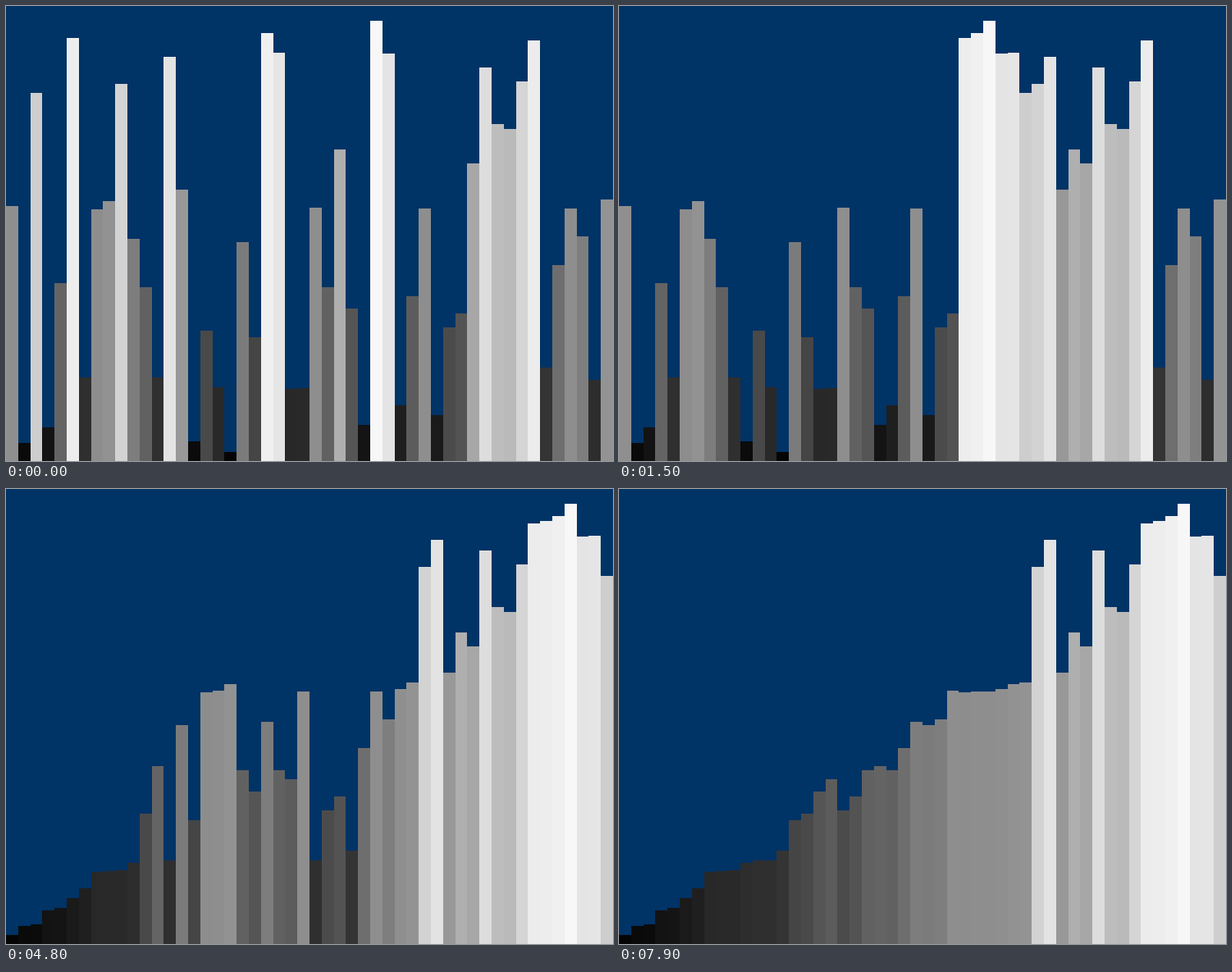
These frames come from a looping animation (740 by 555 pixels, 8000 ms). A matplotlib script:

```python
from itertools import islice

import matplotlib.pyplot as plt
from matplotlib.animation import FuncAnimation
from matplotlib.patches import Rectangle

W, H = 740, 555
FRAME_MS, LOOP_MS = 50, 8000
STEP_MS, LEAD_MS = 40, 20  # one comparison per step

# The unsorted input: everything else follows from the sort.
VALUES = [
    311, 22, 449, 41, 217, 516, 102, 307, 317, 460,
    271, 212, 102, 493, 331, 24, 159, 90, 11, 267,
    151, 522, 498, 88, 89, 309, 212, 380, 186, 44,
    537, 497, 68, 201, 308, 56, 163, 180, 363, 480,
    411, 405, 463, 513, 114, 239, 308, 274, 99, 319,
]
N = len(VALUES)


def quicksort(a, lo, hi):
    """Sort in place (last item as pivot), yielding after every step."""
    if lo >= hi:
        return
    pivot, i = a[hi], lo
    for j in range(lo, hi):
        if a[j] < pivot:
            a[i], a[j] = a[j], a[i]
            i += 1
        yield a[:]
    a[i], a[hi] = a[hi], a[i]
    yield a[:]
    yield from quicksort(a, lo, i - 1)
    yield from quicksort(a, i + 1, hi)


def step_at(frame):
    return (frame * FRAME_MS + LEAD_MS) // STEP_MS


def edge(k):
    """Left side of bar k on the pixel grid."""
    return round(k * W / N)


n_frames = LOOP_MS // FRAME_MS
sorting = quicksort(VALUES[:], 0, N - 1)
states = list(islice(sorting, step_at(n_frames) + 1))

fig = plt.figure(figsize=(4, 3), dpi=W / 4, facecolor="#003366")
ax = fig.add_axes([0, 0, 1, 1])
ax.set_xlim(0, W)
ax.set_ylim(0, H)
ax.axis("off")

bars = [
    ax.add_patch(Rectangle((edge(k), 0), edge(k + 1) - edge(k), v,
                           linewidth=0, snap=True))
    for k, v in enumerate(VALUES)
]


def draw(frame):
    for bar, v in zip(bars, states[step_at(frame)]):
        bar.set_height(v)
        bar.set_facecolor((v / H,) * 3)
    return bars


anim = FuncAnimation(fig, draw, frames=n_frames, interval=FRAME_MS,
                     repeat=True, repeat_delay=0)
plt.show()
```
